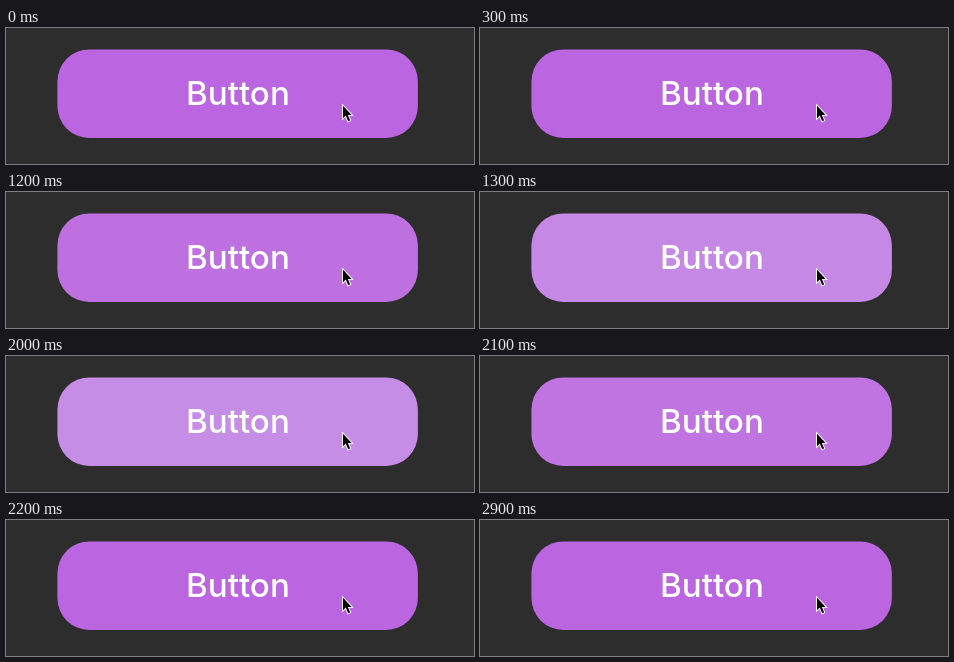
These frames come from a looping animation (468x136 px, 3.25 s). An HTML page:

```html
<!DOCTYPE html>
<html lang="en">
<head>
<meta charset="utf-8">
<title>Button</title>
<style>
  html, body { margin: 0; width: 100%; height: 100%; overflow: hidden; background: #2d2d2d; }
  svg { display: block; }
  text { font: 500 33.2px Inter, sans-serif; fill: #fff; text-anchor: middle; }
</style>
</head>
<body>
<svg width="468" height="136" viewBox="0 0 468 136">
  <rect id="button" x="51.4" y="21.4" width="360.5" height="88.6" rx="32"/>
  <text x="231.9" y="77.3">Button</text>
  <path d="M337 77.8v12.5l2.8-2.7 2.4 5.7 2-.9-2.4-5.5h3.9z" stroke="#fff" stroke-width="1.8" paint-order="stroke"/>
</svg>
<script>
  const LOOP = 3250, STEP = 100, FADE = 283;
  const PRESS = 1117, RELEASE = 1917;
  const normal = [187, 101, 224], pressed = [201, 152, 231];
  const button = document.getElementById('button');

  function ease(t, start) {
    const p = Math.min(1, Math.max(0, (t - start) / FADE));
    return p * p * (3 - 2 * p);
  }

  function draw(now) {
    const t = Math.floor(now % LOOP / STEP) * STEP;
    const k = ease(t, PRESS) - ease(t, RELEASE);
    const color = normal.map((c, i) => Math.round(c + (pressed[i] - c) * k));
    button.setAttribute('fill', `rgb(${color})`);
  }

  const begin = performance.now();
  function tick() {
    draw(performance.now() - begin);
    requestAnimationFrame(tick);
  }
  tick();
</script>
</body>
</html>
```
